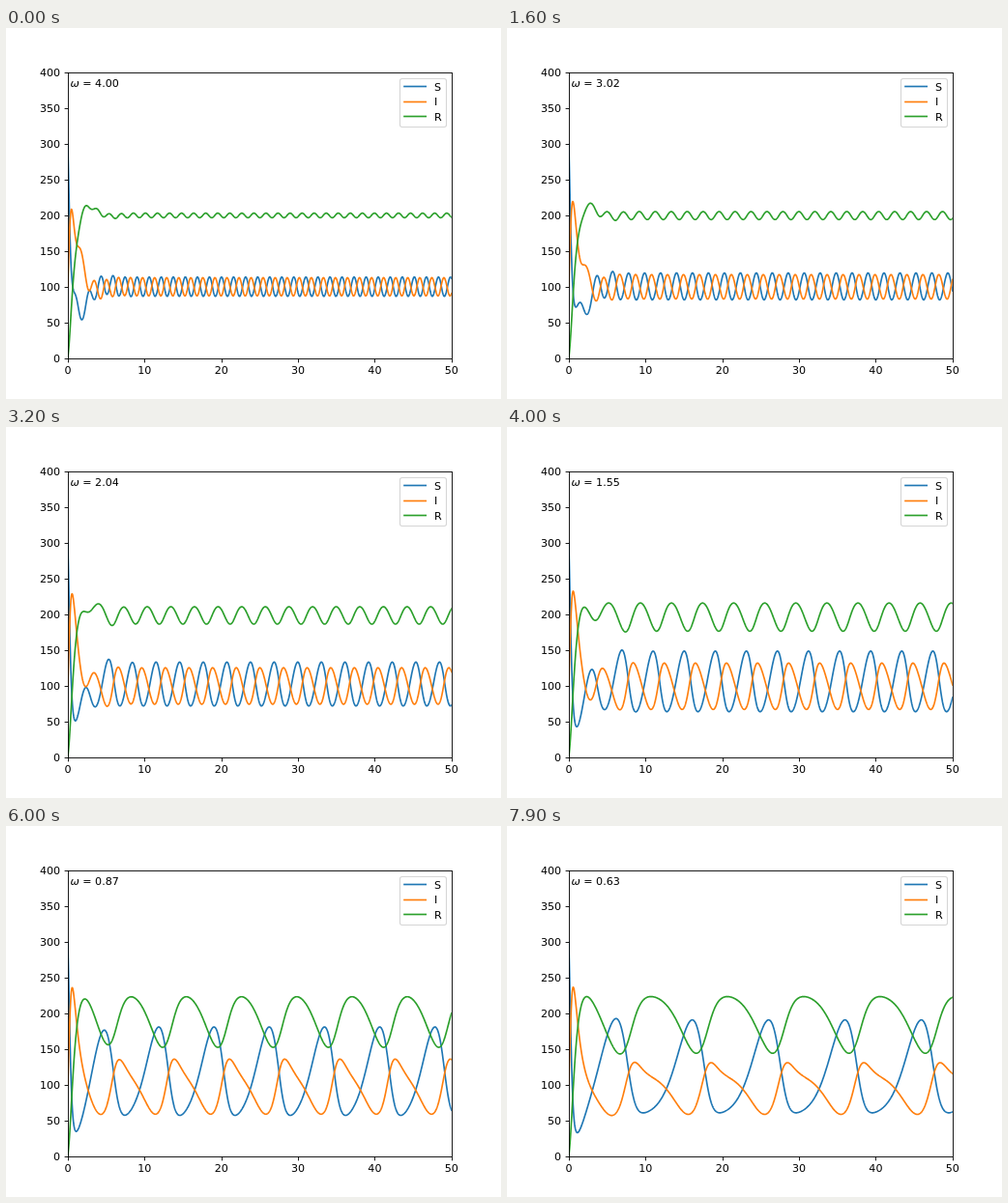
Write an HTML page that moves like this. It is 512x384 px and loops after 8000 ms.

```html
<!DOCTYPE html>
<html lang="en">
<head>
<meta charset="utf-8">
<title>Seasonally forced SIRS model</title>
<style>
  html, body { margin: 0; width: 100%; height: 100%; overflow: hidden; background: #fff; }
  svg { display: block; width: 512px; height: 384px; }
  text { font: 11.11px "DejaVu Sans", sans-serif; fill: #000; white-space: pre; }
  .curve { fill: none; stroke-width: 1.667; stroke-linejoin: round; stroke-linecap: square; }
  .axis { fill: none; stroke: #000; stroke-width: .889; stroke-linecap: square; }
  .tick { stroke-linecap: butt; }
  .italic { font-style: oblique; }
</style>
</head>
<body>
<svg viewBox="0 0 512 384" xmlns="http://www.w3.org/2000/svg">
  <clipPath id="area"><rect x="64" y="46.08" width="396.8" height="295.68"/></clipPath>
  <g id="curves" clip-path="url(#area)"></g>
  <g id="axes"><rect class="axis" x="64.5" y="46.5" width="397" height="296"/></g>
  <text x="66.4" y="61"><tspan class="italic">ω</tspan><tspan id="omega"> = 4.00</tspan></text>
  <g id="legend">
    <rect x="407.5" y="52.5" width="48" height="50" rx="2.2"
          fill="#fff" fill-opacity=".8" stroke="#ccc" stroke-opacity=".8" stroke-width="1.11"/>
  </g>
</svg>
<script>
const $ = id => document.getElementById(id);
const LEFT = 64, BOTTOM = 341.76, X_UNIT = 396.8 / 50, Y_UNIT = 295.68 / 400;
const TOTAL = 400, RECOVERY = 1, WANING = 0.5, DT = 0.05, T_END = 50;
const FRAME_MS = 100, FRAMES = 80;
const SERIES = [['S', '#1f77b4'], ['I', '#ff7f0e'], ['R', '#2ca02c']];

const toX = t => LEFT + t * X_UNIT;
const toY = v => BOTTOM - v * Y_UNIT;
const snap = v => Math.floor(v + 0.5) + 0.5;

function add(parent, tag, attrs, text = '') {
  const el = document.createElementNS('http://www.w3.org/2000/svg', tag);
  for (const key in attrs) el.setAttribute(key, attrs[key]);
  el.textContent = text;
  return parent.appendChild(el);
}

function drawAxes() {
  for (let t = 0; t <= 50; t += 10) {
    const x = snap(toX(t));
    add($('axes'), 'path', { class: 'axis tick', d: `M${x} 342.5v3.9` });
    add($('axes'), 'text', { x: toX(t), y: 358.2, 'text-anchor': 'middle' }, t);
  }
  for (let v = 0; v <= 400; v += 50) {
    const y = snap(toY(v));
    add($('axes'), 'path', { class: 'axis tick', d: `M64.5 ${y}h-3.9` });
    add($('axes'), 'text', { x: 56.2, y: y + 3.7, 'text-anchor': 'end' }, v);
  }
}

function drawLegend() {
  SERIES.forEach(([name, color], i) => {
    const y = 60.4 + i * 15.7;
    add($('legend'), 'path', { class: 'curve', stroke: color, d: `M412 ${snap(y - 0.5)}h22.2` });
    add($('legend'), 'text', { x: 443.1, y: Math.round(y + 4.2) }, name);
  });
}

// Rates of change of S and I; R is what remains of the total.
function rates(t, s, i, omega) {
  const contact = 4 + 2 * Math.cos(omega * t);
  const infections = contact * s * i / TOTAL;
  return [WANING * (TOTAL - s - i) - infections, infections - RECOVERY * i];
}

function solve(omega) {
  const lines = [[], [], []];
  const steps = Math.round(T_END / DT);
  let s = 300, i = 100;
  for (let n = 0; n <= steps; n++) {
    const t = n * DT, x = toX(t).toFixed(2);
    [s, i, TOTAL - s - i].forEach((v, k) => lines[k].push(x + ' ' + toY(v).toFixed(2)));
    const a = rates(t, s, i, omega);
    const b = rates(t + DT / 2, s + a[0] * DT / 2, i + a[1] * DT / 2, omega);
    const c = rates(t + DT / 2, s + b[0] * DT / 2, i + b[1] * DT / 2, omega);
    const d = rates(t + DT, s + c[0] * DT, i + c[1] * DT, omega);
    s += DT / 6 * (a[0] + 2 * b[0] + 2 * c[0] + d[0]);
    i += DT / 6 * (a[1] + 2 * b[1] + 2 * c[1] + d[1]);
  }
  return lines.map(points => 'M' + points.join('L'));
}

// Fast sweep from 4 to 1, then a slow one below 1.
const omegaAt = n => n < 50 ? 4 - 3 * n / 49 : 1 - 0.75 * (n - 50) / 59;

drawAxes();
drawLegend();
const curves = SERIES.map(([, color]) => add($('curves'), 'path', { class: 'curve', stroke: color }));

let shown = -1;
function render(frame) {
  if (frame === shown) return;
  shown = frame;
  const omega = omegaAt(frame);
  solve(omega).forEach((d, k) => curves[k].setAttribute('d', d));
  $('omega').textContent = ' = ' + omega.toFixed(2);
}

render(0);
const start = performance.now();
(function tick() {
  render(Math.floor((performance.now() - start) / FRAME_MS) % FRAMES);
  requestAnimationFrame(tick);
})();
</script>
</body>
</html>
```
